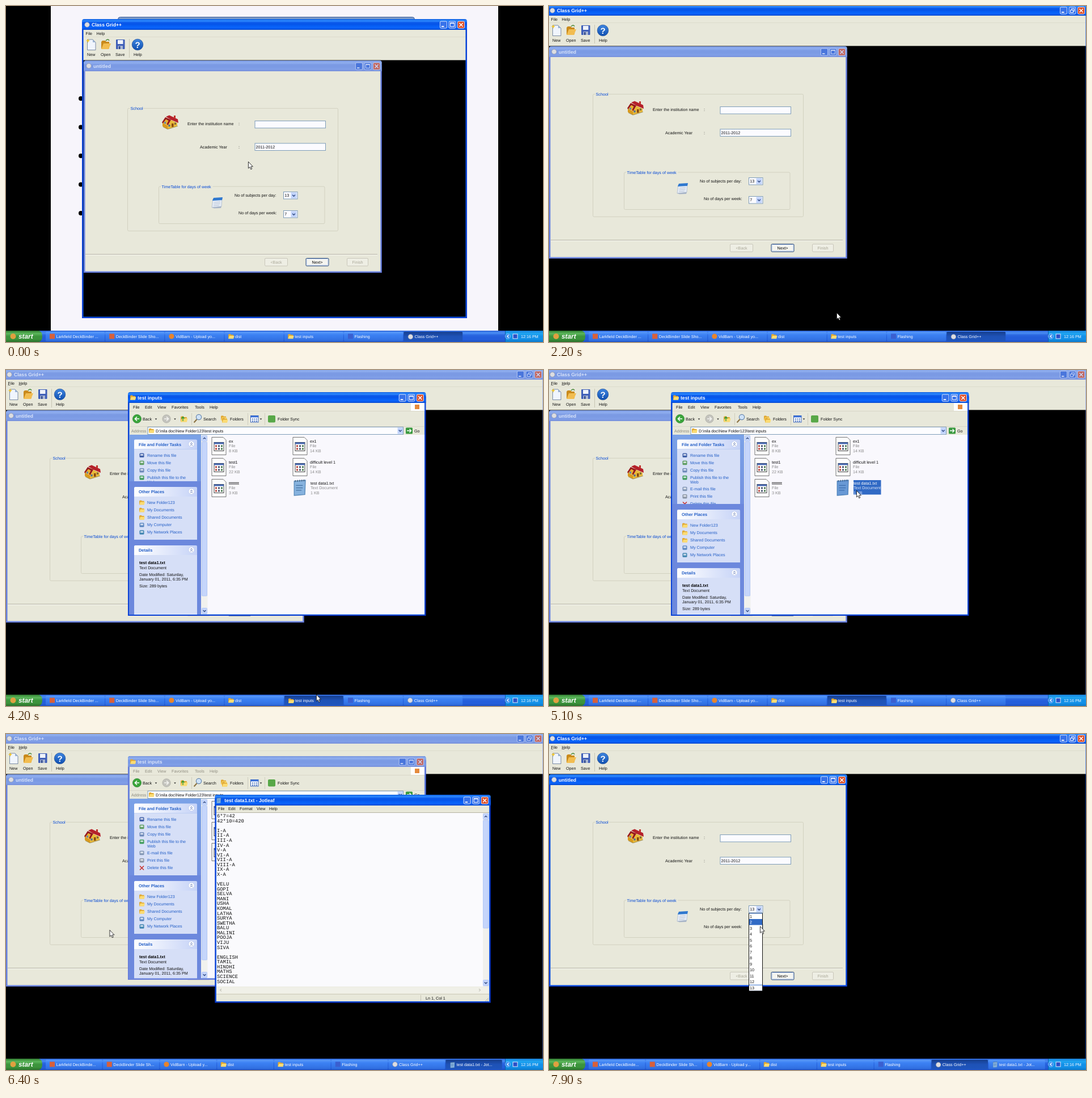
An HTML page that plays this animation: 947x592 px, repeating every 8 s.

```html
<!DOCTYPE html>
<html lang="en">
<head>
<meta charset="utf-8">
<title>Timetable wizard demo</title>
<style>
html,body{margin:0;width:100%;height:100%;overflow:hidden;background:#000}
svg{display:block;width:947px;height:592px}
text{font:7.2px "Liberation Sans",Arial,sans-serif;text-rendering:geometricPrecision}
.title{font-size:8.6px;font-weight:bold}
.bold{font-size:7.4px;font-weight:bold}
.mono{font:8.85px "Liberation Mono",monospace}
.start{font-size:11.8px;font-weight:bold;font-style:italic}
.mid{text-anchor:middle}
.panels{animation:slide 8s linear infinite}
.cursor{animation:point 8s linear infinite}
@keyframes slide{
  0%,61.25%{transform:translateY(-40px)}
  63.75%{transform:none}
  66.25%,100%{transform:translateY(13px)}
}
@keyframes point{
  0%,3%{transform:translate(427px,274px)}
  12.5%,18%{transform:translate(785.5px,30px)}
  23%{transform:translate(640px,330px)}
  27.5%,36%{transform:translate(507px,540px)}
  45%,55%{transform:translate(547px,571.5px)}
  61%,70%{transform:translate(542px,212px)}
  79.5%,82%{transform:translate(182.5px,345px)}
  90%,94%{transform:translate(371px,308px)}
  98.5%,100%{transform:translate(372px,338.5px)}
}
</style>
</head>
<body>
<script>
const LOOP = 8000, FACE = '#e8e8da', BLUE = '#0046d5', PICK = '#316ac5';
const APP = 'Class Grid++';
let css = '', defs = '';

const esc = s => s.replace(/&/g, '&amp;').replace(/</g, '&lt;');
const T = (x, y, s, fill = '#111', cls = '') =>
  `<text x="${x}" y="${y}" fill="${fill}" class="${cls}">${esc(s)}</text>`;
const R = (x, y, w, h, fill, more = '') =>
  `<rect x="${x}" y="${y}" width="${w}" height="${h}" fill="${fill}" ${more}/>`;
const C = (x, y, r, fill, more = '') => `<circle cx="${x}" cy="${y}" r="${r}" fill="${fill}" ${more}/>`;
const P = (d, fill, more = '') => `<path d="${d}" fill="${fill}" ${more}/>`;
const line = (d, color, w = 1) => P(d, 'none', `stroke="${color}" stroke-width="${w}"`);
const box = (x, y, w, h, fill, stroke, rx = 0, sw = 1) =>
  R(x, y, w, h, fill, `stroke="${stroke}" stroke-width="${sw}" rx="${rx}"`);
const move = (x, y, s) => `<g transform="translate(${x} ${y})">${s}</g>`;

// Hidden at first, shown from the given time to the end of the loop
const from = (ms, ...kids) => {
  css += `@keyframes a${ms}{0%{opacity:0}${ms / LOOP * 100}%{opacity:1}}
    .a${ms}{animation:a${ms} ${LOOP}ms step-end infinite}`;
  return `<g class="a${ms}">${kids.join('')}</g>`;
};
const grad = (id, stops, across = 0) => {
  const n = stops.length - 1;
  defs += `<linearGradient id="${id}" x2="${across}" y2="${1 - across}">` +
    stops.map((c, i) => `<stop offset="${i / n}" stop-color="${c}"/>`).join('') + '</linearGradient>';
};
grad('on', ['#0a5ce0', '#2f8bff', '#0a58ea', '#0555ea', '#0660f6', '#0a63fa', '#0446cc']);
grad('off', ['#7593dc', '#90aff0', '#7b9ae4', '#7b9ae4', '#809fe8', '#7890da']);
grad('bar', ['#2a62d8', '#4a8ff5', '#2a66e0', '#245edb', '#245edb', '#1d4fc0']);
grad('task', ['#5a9bfa', '#3c81f3', '#3678ea', '#2f6cdd']);
grad('down', ['#163f90', '#1e52b7', '#1f55bc']);
grad('tray', ['#1a7fd8', '#1fa6f2', '#1290e8', '#1290e8', '#0d78c8']);
grad('go', ['#2f7a2f', '#5cb85c', '#3c943c', '#3c943c', '#2a6e2a']);
grad('side', ['#7ba2e7', '#6375d6']);
grad('head', ['#fff', '#c6d3f7'], 1);
grad('help', ['#3f86e0', '#0f4fb0']);
defs += '<clipPath id="pane"><rect x="217.6" y="114" width="126.4" height="316.4"/></clipPath>';

// Small icons
const dot = (x, y) => C(x, y, 4.3, '#dcdde2', 'stroke="#8d8f9a" stroke-width=".6"');
const folder = (x, y, k = 1) => `<g transform="translate(${x} ${y}) scale(${k})">` +
  P('M0 1.5 1 .5H4L5 1.7H9V8.5H0Z', '#e0a832') + P('M2 3.5H10.5L9 8.7H0Z', '#fbdc74') + '</g>';
const chevron = (x, y) => line(`M${x - 2.4} ${y - 1.2} ${x} ${y + 1.2} ${x + 2.4} ${y - 1.2}`, '#334d85', 1.5);
const arrow = (x, y) => P(`M${x - 1.8} ${y - 1}H${x + 1.8}L${x} ${y + 1.2}Z`, '#222');
const scrollKey = (x, y, w, h) => box(x + .5, y + .5, w - 1, h - 1, '#c5d5fb', '#b3c8f6', 1);
const jot = (x, y, k = 1) => `<g transform="translate(${x} ${y}) scale(${k})">` +
  P('M.8 1.2 8.2 .6 7.8 10 .8 10.6Z', '#86b2de', 'stroke="#4a7fb0" stroke-width=".4"') +
  line('M1.6 .6V1.8M3 .5V1.7M4.4 .4V1.6M5.8 .3V1.5M7.2 .2V1.4', '#47637f', .5) +
  line('M2 4H6.4M2 5.6H6.4M2 7.2H5.6', '#4674a4', .5) + '</g>';

function key(kind, x, y, on) {
  const fill = kind == 'close' ? (on ? '#dd4f27' : '#c2665f') : on ? '#3872ea' : '#4a76dc';
  const edge = on ? '#fff' : '#c9d6f5';
  const marks = {
    min: R(x + 3, y + 8.6, 4.4, 1.8, edge),
    max: line(`M${x + 3} ${y + 3.5}H${x + 10}V${y + 9.8}H${x + 3}Z`, edge, 1) + R(x + 2.5, y + 2.7, 8, 1.6, edge),
    restore: line(`M${x + 5} ${y + 5}V${y + 3.2}H${x + 10}V${y + 7.5}H${x + 8.5}M${x + 3} ${y + 5.6}H${x + 8}V${y + 10}H${x + 3}Z`, edge, 1),
    close: line(`M${x + 3.4} ${y + 3.4} ${x + 9.6} ${y + 9.6}M${x + 9.6} ${y + 3.4} ${x + 3.4} ${y + 9.6}`, edge, 1.5)
  };
  return box(x + .4, y + .4, 12.2, 12.2, fill, edge, 2, .8) + marks[kind];
}

function frame(x, y, w, h, title, on, pad = 17, mid = 'max') {
  const r = x + w, ky = y + 3.6;
  const edge = (d, sw, color) => box(x + d, y + 8, w - 2 * d, h - 8 - d, 'none', color, 0, sw);
  return edge(1.7, 1.8, on ? '#0b50de' : '#7089e0') + edge(.5, 1, on ? '#0a34cf' : '#5f74d8') +
    P(`M${x} ${y + 19}V${y + 4}q0-4 4-4H${r - 4}q4 0 4 4V${y + 19}Z`, `url(#${on ? 'on' : 'off'})`) +
    T(x + 17, y + 13.4, title, on ? '#fff' : '#dbe5fa', 'title') +
    key('min', r - pad - 31, ky, on) + key(mid, r - pad - 15.5, ky, on) + key('close', r - pad, ky, on);
}
const menu = (y, items, fill) => items.map(([x, s]) => T(x, y, s, fill)).join('');

const house = P('M139 181 148 185.5V192L139 187Z', '#d99a1c') + P('M148 185 154 176 165 181V186.5L148 192Z', '#e8b93a') +
  P('M144 171.5 154 175.5 148 185 139 181Z', '#e6b032') +
  P('M145 170 151 167.5 166 174.5 167 181 154 175.5Z', '#b5202a') +
  P('M144 171 154 175.5 148.5 185 146.5 183.5 149.5 177 145 174.5 139.5 182 138 180Z', '#96161e') +
  R(159, 168, 3, 5, '#c0322c') + R(155, 182, 3.5, 6, '#8a4a10') + R(142, 179, 3, 3.5, '#6c86a0') +
  R(149.5, 184, 3, 3.5, '#4a6e98') + R(160, 180.5, 3, 3.5, '#7c6a3c') + line('M140 188 148 192 166 186.5', '#8c7a3c', .8);
const calendar = P('M228 315 244 313 243 328 226 330Z', '#e6ecf5', 'stroke="#9aabc4" stroke-width=".6"') +
  P('M229 313 245 312 244 317 227 318Z', '#2f78cf') + P('M226 330 243 328 242 331 230 331.5Z', '#a7b4c8') +
  line('M230 321 241 320M229.5 324 240.5 323M229 327 239 326', '#b3c0d4', .9);

const field = (x, y, w) => box(x + .5, y + .5, w, 12.5, '#fbfbff', '#7f9db9');
const combo = (y, s) => field(352, y, 24.5) + R(365.5, y + 1.5, 10, 10.5, '#c2d4fb') +
  chevron(370.5, y + 7) + T(354.3, y + 9.3, s);
const button = (x, w, s, live) => box(x + .5, 419.5, w, 13.5, live ? '#f5f5f0' : '#eeeee4', live ? '#1a3c70' : '#c9c7ba', 1.5) +
  (live ? box(x + 1.7, 420.7, w - 2.4, 11, 'none', '#b5cbee', 1) : '') +
  T(x + w / 2 + .5, 429, s, live ? '#000' : '#a9a797', 'mid');
const group = (x, y, w, h, s, gap) => box(x, y, w, h, 'none', '#d2d1c0', 2) +
  R(x + 4, y - 2, gap, 4, FACE) + T(x + 5, y + 3, s, BLUE);

const form = R(2, 90, 522, 354, FACE) +
  group(77.5, 155.3, 371, 216, 'School', 23) + house +
  T(183, 184.5, 'Enter the institution name') + T(273, 184.5, ':') + field(301.5, 177, 124.5) +
  T(205, 225.7, 'Academic Year') + T(273, 225.7, ':') + field(301.5, 216.5, 124.5) + T(303.5, 225.7, '2011-2012') +
  group(132.5, 293, 292.5, 65.5, 'TimeTable for days of week', 91) + calendar +
  T(266, 311.3, 'No of subjects per day:') + combo(302, '13') +
  T(273, 342.3, 'No of days per week:') + combo(335, '7') +
  line('M3 412.5H518', '#b3b1a2') + line('M3 413.5H518', '#fafaf5') +
  button(319, 40, '<Back') + button(391.5, 40, 'Next>', true) + button(464, 37, 'Finish');

const tools =
  P('M6.5 34H16L21 39V52.5H6.5Z', '#f0f5fd', 'stroke="#5f7390" stroke-width=".8"') + P('M16 34V39H21Z', '#9db4d4') +
  P('M4 36 6.5 35 7.5 32.5 8.5 35 11 36 8.5 37.2 7.5 40 6.5 37.2Z', '#f2c62c') +
  P('M31 38 33 36H38L40 38H45V50H31Z', '#c98a1c') + P('M35 41H48L44 51H31Z', '#f2bd50') + line('M39 36q4-4 6 0', '#4c8a3c', 1.4) +
  R(57, 34, 15.5, 17, '#3f5fb8', 'rx="1"') + R(60, 35, 9.5, 7, '#eef2fa') + R(60.5, 45, 8.5, 6, '#a9b6d2') + R(62, 46, 2.5, 5, '#2c458c') +
  line('M80.5 33V66', '#c7c5b4') + C(95, 43, 9.8, 'url(#help)', 'stroke="#123f8a" stroke-width=".6"') +
  `<text x="95" y="48.5" fill="#fff" class="mid" style="font-size:15px;font-weight:bold">?</text>` +
  menu(62.7, [[6, 'New'], [30, 'Open'], [56, 'Save'], [88, 'Help']]);

const hints = R(3.5, 26.3, 4, .7, '#222') + R(22.5, 26.3, 5, .7, '#222');

function mainWindow(w, h, on, innerOn, mid) {
  return R(-1, 10, w - 4, h - 14, '#000') + R(-1, 17, w - 4, 53.4, FACE) +
    line(`M0 29.5H${w - 6}`, '#dddccd') +
    frame(-3, -2, w, h, APP, on, 17, mid) + dot(6, 8) +
    menu(25.6, [[3.5, 'File'], [22.5, 'Help']]) + tools + form +
    frame(0, 71, 525.8, 374, 'untitled', innerOn, 15.8) + dot(9, 80.5);
}
const fullMain = (on, innerOn) => mainWindow(952, 580, on, innerOn, 'restore');

const slide = R(79, 0, 789, 572, '#f7f5fb') + box(197.5, 19.5, 523, 20, '#7d9bc8', '#3d5f9c', 4) +
  [163, 213.5, 264, 314.5, 365].map(y => C(132, y, 4, '#000')).join('');

// File browser
const listMenu = fill => menu(67.8, [[224, 'File'], [245, 'Edit'], [267, 'View'], [292, 'Favorites'], [333, 'Tools'], [359, 'Help']], fill);
const page = (x, y) => P(`M${x} ${y}H${x + 20}L${x + 25} ${y + 5}V${y + 31}H${x}Z`, '#fdfdfd', 'stroke="#555" stroke-width=".8"') +
  box(x + 4, y + 9, 17, 15, '#fff', '#444') + R(x + 4, y + 9, 17, 3, '#4567b0') +
  [0, 1, 2, 3, 4, 5].map(i => R(x + 6 + i % 3 * 5, y + 14 + (i > 2) * 5, 3, 3, ['#b8443c', '#44506c', '#4a7a50'][i % 3])).join('');
const file = (x, y, name, kind, size, a = '#111', b = '#8a8a8a') =>
  T(x, y + 9.5, name, a) + T(x, y + 18, kind, b) + T(x, y + 26.5, size, b);
const entry = (x, y, name, size) => page(x, y + .5) + file(x + 30, y, name, 'File', size);
const panelHead = (y, s) => P(`M226 ${y + 17}V${y + 2}q0-2 2-2H335q2 0 2 2V${y + 17}Z`, 'url(#head)') +
  T(234, y + 11.4, s, '#215dc6', 'bold') + C(327, y + 8, 5, '#fff', 'stroke="#b5c4ea" stroke-width=".6"') +
  line(`M325 ${y + 7.6}l2-2 2 2M325 ${y + 10.6}l2-2 2 2`, '#2a4a9c', .9);
const link = (y, s, color) => R(235.5, y - 6, 8, 7.5, color, 'rx="1.5"') + R(237, y - 4.6, 5, 3, '#f3f6fc', 'opacity=".75"') + T(249, y, s, '#215dc6');
const place = (y, s) => folder(235, y - 6.5, .95) + T(249, y, s, '#215dc6');

const sidebar = `<g clip-path="url(#pane)">` + R(217, 114, 127, 317, 'url(#side)') +
  panelHead(122.5, 'File and Folder Tasks') + R(226, 139.5, 111, 109.5, '#d6dff7') +
  link(152.5, 'Rename this file', '#4060a8') + link(165.7, 'Move this file', '#5c9c60') + link(178.9, 'Copy this file', '#6c88b8') +
  link(192, 'Publish this file to the', '#3c9a58') + T(249, 200.3, 'Web', '#215dc6') +
  link(211.8, 'E-mail this file', '#8296b4') + link(225, 'Print this file', '#8a94a4') +
  line('M236 232.5 243 239.5M243 232.5 236 239.5', '#c8302c', 1.6) + T(249, 238.2, 'Delete this file', '#215dc6') +
  '<g class="panels">' + R(217, 236, 127, 250, '#6c88dd') +
  panelHead(246, 'Other Places') + R(226, 263, 111, 76, '#d6dff7') +
  place(275.7, 'New Folder123') + place(288.8, 'My Documents') + place(302, 'Shared Documents') +
  link(315.2, 'My Computer', '#5a86c0') + link(328.3, 'My Network Places', '#3f84b0') +
  panelHead(349, 'Details') + R(226, 366, 111, 120, '#d6dff7') +
  T(235, 382, 'test data1.txt', '#000', 'bold') + T(235, 390.6, 'Text Document') +
  T(235, 402.6, 'Date Modified: Saturday,') + T(235, 411, 'January 01, 2011, 6:35 PM') + T(235, 423, 'Size: 289 bytes') +
  '</g></g>';

const rule = x => line(`M${x}.5 76V97`, '#cfcdbd');
const browser = R(217, 50, 522, 381, FACE) + frame(215, 39, 525.5, 394, 'test inputs', true, 16.7) + folder(219, 44) +
  listMenu('#111') + R(714, 58, 24, 14, '#fff') + R(721, 61, 8, 8, '#e58a3c') +
  line('M218 72.5H738M218 99.5H738', '#d9d7c8') +
  C(231, 86, 7.6, '#3aa53a', 'stroke="#23782a" stroke-width=".6"') + line('M235 86H228M231 82.5 227.5 86 231 89.5', '#fff', 1.7) +
  T(241, 88.8, 'Back') + arrow(264.5, 86.5) +
  C(283, 86, 7.2, '#c3c3bd', 'stroke="#a5a59c" stroke-width=".6"') + line('M279 86H286M283 82.5 286.5 86 283 89.5', '#f4f4f0', 1.7) + arrow(298, 86.5) +
  folder(308, 81, 1.2) + line('M312 90V83M309.5 85.5 312 82.5 314.5 85.5', '#2f9a38', 1.4) + rule(327) +
  C(340, 83, 4.6, '#cfe3f8', 'stroke="#6484ac" stroke-width="1.2"') + line('M336.5 87 331.5 92.5', '#8a7040', 2) + T(348, 88.8, 'Search') +
  folder(379, 80, 1) + folder(381, 84, 1) + T(395, 88.8, 'Folders') + rule(426) +
  box(431.5, 80.5, 13.5, 11.5, '#fff', '#3a64b8') + R(431.5, 80.5, 13.5, 3, '#3a70d8') +
  [434, 437.5, 441].map(x => R(x, 85.5, 2, 2, '#4a74c0') + R(x, 89, 2, 2, '#4a74c0')).join('') + arrow(449.5, 86.5) + rule(456) +
  R(462, 80, 13, 12.5, '#58a848', 'rx="2"') + T(479, 88.8, 'Folder Sync') +
  T(221, 109.8, 'Address', '#8c8a7c') + box(250, 100.5, 450.5, 13, '#fdfdff', '#7f9db9') + folder(252, 102.5, .95) +
  T(264, 109.8, 'D:\\nila doc\\New Folder123\\test inputs') + R(690.5, 101.5, 9.5, 11, '#c2d4fb') + chevron(695.2, 107) +
  R(705, 101.5, 12, 11, '#3a9a40', 'rx="1.5"') + line('M707 107H714M711.5 104 714.5 107 711.5 110', '#fff', 1.4) + T(720, 109.8, 'Go') +
  sidebar + R(344, 114, 12, 316.4, '#f1f1ee') + scrollKey(345, 115, 10, 11) + scrollKey(345, 126.5, 10, 272) + scrollKey(345, 419, 10, 11) +
  line('M347.8 121.5 350 119.5 352.2 121.5', '#334d85', 1.3) + chevron(350, 424.5) +
  R(355.5, 114, 382.4, 316.4, '#f9f8fd') +
  entry(363, 118, 'ex', '8 KB') + entry(363, 155, 'test1', '22 KB') + entry(363, 192, 'ttttttttt', '3 KB') +
  entry(506, 118, 'ex1', '14 KB') + entry(506, 155, 'difficult level 1', '14 KB') +
  jot(506, 192.5, 2.7) + file(537, 192, 'test data1.txt', 'Text Document', '1 KB') +
  from(4900, R(537, 194, 48.5, 25.5, PICK), file(537, 192, 'test data1.txt', 'Text Document', '1 KB', '#fff', '#dce6fa'),
    P('M508.2 195.7 528.1 194.1 527.1 219.5 508.2 221.1Z', PICK, 'opacity=".35"'));
const browserIdle = frame(215, 39, 525.5, 394, 'test inputs', false, 16.7) + folder(219, 44) +
  R(218, 60, 490, 11.5, FACE) + listMenu('#8f8d80');

// Text editor
const roman = 'I II III IV V VI VII VIII IX X'.split(' ').map(s => s + '-A');
const staff = 'VELU GOPI SELVA MANI USHA KOMAL LATHA SURYA SWETHA BALU MALINI POOJA VIJU SIVA'.split(' ');
const subjects = 'ENGLISH TAMIL HINDHI MATHS SCIENCE SOCIAL'.split(' ');
const lines = ['6*7=42', '42*10=420', '', ...roman, '', ...staff, '', ...subjects];
const editor = R(370, 118, 483, 354, FACE) + frame(368.3, 107, 486.4, 366.6, 'test data1.txt - Jotleaf', true) + jot(371, 112, .95) +
  menu(133.8, [[374, 'File'], [392, 'Edit'], [412, 'Format'], [442, 'View'], [464, 'Help']]) +
  R(371, 139, 470, 306, '#fafafd') + line('M371 138.5H852', '#b5b3a4') +
  lines.map((s, i) => s && T(372, +(147.2 + i * 8.57).toFixed(2), s, '#111', 'mono')).join('') +
  R(841, 139, 11, 306, '#f0f0ed') + scrollKey(841, 140, 10.5, 11) + scrollKey(841, 151.5, 10.5, 191) + scrollKey(841, 433, 10.5, 11) +
  line('M844 146.5 846.2 144.5 848.4 146.5', '#334d85', 1.3) + chevron(846.2, 438.5) +
  R(371, 445.5, 481, 11.5, '#f0f0e8') + line('M380 449 377.5 451.2 380 453.4M834 449 836.5 451.2 834 453.4', '#c4c3b8', 1.2) +
  line('M371 458.5H852', '#cfcdbd') + line('M731.5 460V470', '#c7c5b4') + T(740, 467.8, 'Ln 1, Col 1') +
  line('M845 471 851 465M848 471 851 468', '#b8b6a6');

const list = box(352.5, 316, 24, 136.5, '#fff', '#111') +
  Array.from({length: 13}, (_, i) => T(354, 323.6 + i * 10.52, String(i + 1))).join('');
const pick = n => R(353, 315.5 + (n - 1) * 10.52, 23, 10.5, PICK) + T(354, 323.6 + (n - 1) * 10.52, String(n), '#fff');
const unpick = n => R(353, 316.5 + (n - 1) * 10.52, 23, 9.5, '#fff') + T(354, 323.6 + (n - 1) * 10.52, String(n));

// Taskbar
const chip = color => x => R(x, 577.5, 9, 9, color);
const ball = color => x => C(x + 4.5, 582, 4.6, color);
const tab = x => folder(x - .5, 577.5);
const tasks = [
  [chip('#d8603a'), 'Larkfield DeckBinder ...', 'Larkfield DeckBinde...'],
  [chip('#d8603a'), 'DeckBinder Slide Sho...', 'DeckBinder Slide Sh...'],
  [ball('#e8842c'), 'VidBarn - Upload yo...', 'VidBarn - Upload y...'],
  [tab, 'dist'], [tab, 'test inputs'], [chip('#3a5fd0'), 'Flashing'],
  [x => dot(x + 4.5, 582), APP], [x => jot(x, 577), 'test data1.txt - Jot...']
];
function taskbar(n, active) {
  const step = n == 7 ? 105.2 : 100.75;
  const cells = tasks.slice(0, n).map(([icon, long, short], i) => {
    const x = 70 + i * step, on = i == active;
    return R(x, 574, step - 1.2, 16.5, `url(#${on ? 'down' : 'task'})`, 'rx="1.5"') +
      move(on ? .7 : 0, on ? .7 : 0, icon(x + 7) + T(x + 18.5, 584.7, n == 7 ? long : short || long, '#fff'));
  });
  return R(0, 572, 947, 20, 'url(#bar)') + cells.join('') +
    P('M0 572H58Q64 574 64 582T58 592H0Z', 'url(#go)') + C(12.5, 582, 5, '#e0a040') + T(22, 586, 'start', '#fff', 'start') +
    R(880, 572, 67, 20, 'url(#tray)') + line('M880.5 572V592', '#0c5cae') +
    C(885, 582, 4.6, '#3a8ef0', 'stroke="#a8d4ff" stroke-width=".6"') + line('M886.5 579.5 884 582 886.5 584.5', '#fff', 1.3) +
    box(894, 578, 8, 8, '#2a50c8', '#dfe8fa') + T(908, 584.7, '12:16 PM', '#fff');
}

const scene = slide + move(137, 25, mainWindow(679, 527, true, false)) +
  from(1200, box(780.5, 26.6, 13, 13, '#123c9c', '#b8cdf8', 2, .8), box(784, 30, 6.5, 6, 'none', '#8fb0f0')) +
  from(1400, fullMain(true, false)) + from(3200, hints) +
  from(4100, fullMain(false, false), hints, browser) +
  from(5600, browserIdle, editor) +
  from(6500, R(0, 0, 947, 592, '#000'), fullMain(true, true), hints) +
  from(7400, list, pick(13)) + from(7700, unpick(13), pick(1)) + from(7800, unpick(1), pick(2)) +
  taskbar(7, 6) + from(4100, taskbar(7, 4)) + from(5600, taskbar(8, 7)) + from(6500, taskbar(8, 6)) +
  '<g class="cursor">' + P('M.4 .4V12L3 9.6 4.8 13.8 6.7 13 4.9 8.9H8.4Z', '#fff', 'stroke="#000" stroke-width=".8"') + '</g>';

document.head.insertAdjacentHTML('beforeend', `<style>${css}</style>`);
document.body.insertAdjacentHTML('beforeend',
  `<svg viewBox="0 0 947 592"><defs>${defs}</defs>${scene}</svg>`);
</script>
</body>
</html>
```
